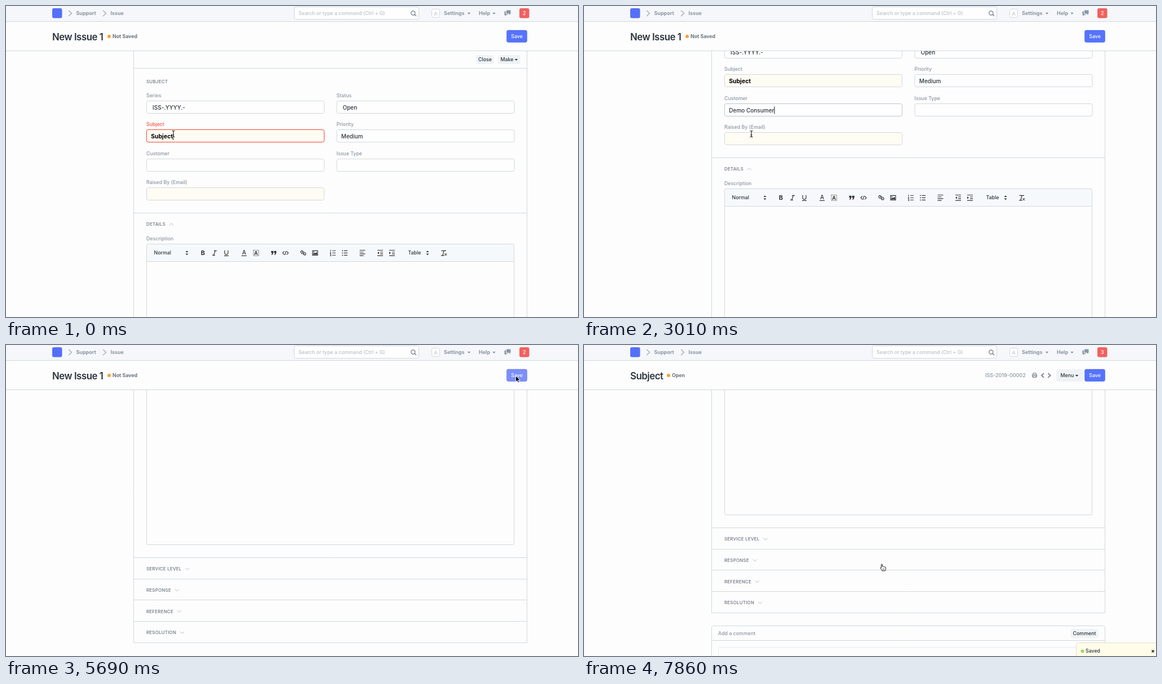
Write an HTML page with a canvas that moves like this. It is 1015x552 px and loops after 8 s.

```html
<!DOCTYPE html>
<html lang="en">
<head>
<meta charset="utf-8">
<title>Issue form</title>
<style>
html, body { margin: 0; height: 100%; overflow: hidden; background: #fdfdfd; }
canvas { display: block; width: 1015px; height: 552px; }
</style>
</head>
<body>
<canvas></canvas>
<script>
const W = 1015, H = 552, LOOP = 8000;
const INK = '#2b343d', GREY = '#8a96a3', MID = '#687480', LINE = '#d1d8dd', PAGE = '#fdfdfd';
const CUSTOMER = 'Demo Consumer';
const canvas = document.querySelector('canvas'), c = canvas.getContext('2d');
const dpr = window.devicePixelRatio || 1;
canvas.width = W * dpr;
canvas.height = H * dpr;

// Value of the last [time, value] key that has been reached.
const at = (t, keys) => keys.reduce((v, k) => t >= k[0] ? k[1] : v, keys[0][1]);

const SCROLL = [[0, 0], [2560, 4], [2710, 25], [2860, 62], [3010, 98], [3160, 120], [3310, 128],
  [3610, 270], [3750, 396], [5990, 0], [7410, 40], [7560, 200], [7710, 420], [7860, 537]];
const POINTER = [[0, ['beam', 297, 227]], [4350, ['beam', 325, 203]], [4500, ['beam', 430, 150]],
  [4650, ['arrow', 610, 82]], [4800, ['arrow', 770, 28]], [4940, ['arrow', 862, 12]],
  [5090, ['hand', 898, 46]], [5240, ['hand', 904, 55]], [5690, ['arrow', 904.5, 54.5]],
  [6190, ['hand', 904.5, 55.5]], [6820, ['arrow', 850, 140]], [6970, ['arrow', 610, 335]],
  [7110, ['hand', 528.5, 388.5]]];
const SAVE = [[0, '#5573fc'], [5090, '#2255fa'], [5690, '#7c8ffb'], [6190, '#2255fa'], [6820, '#5573fc']];
const TOAST = [[0, W + 5], [6340, 937], [6490, 880], [6670, 873]];

function text(s, x, y, color = INK, size = 8.8, weight = 500, align = 'left', spacing = 0) {
  c.font = `${weight} ${size}px Inter, sans-serif`;
  c.letterSpacing = spacing + 'px';
  c.textAlign = align;
  c.fillStyle = color;
  c.fillText(s, x, y + size * .36);
}
function box(x, y, w, h, fill, stroke, r = 3) {
  c.beginPath();
  c.roundRect(x, y, w, h, r);
  if (fill) { c.fillStyle = fill; c.fill(); }
  if (stroke) { c.strokeStyle = stroke; c.lineWidth = 1; c.stroke(); }
}
function shape(d, x, y, { fill, stroke, width = 1 }) {
  const p = new Path2D(d);
  c.save();
  c.translate(x, y);
  if (fill) { c.fillStyle = fill; c.fill(p); }
  if (stroke) { c.strokeStyle = stroke; c.lineWidth = width; c.stroke(p); }
  c.restore();
}
const crisp = y => Math.floor(y) + .5;
const rule = (y, x = 226, x2 = 925) => shape(`M${x} ${crisp(y)}H${x2}`, 0, 0, { stroke: LINE });
const dot = (x, y, color) => box(x - 3, y - 3, 6, 6, color, null, 3);
const down = (x, y, color) => shape('M-2.8-1.5H2.8L0 1.6Z', x, y, { fill: color });
const plus = (x, y) => shape('M-3.2 0H3.2M0-3.2V3.2', x, y, { stroke: GREY });

function heading(s, y, arrow) {
  text(s, 249, y, MID, 7.9, 500, 'left', .25);
  const x = 249 + c.measureText(s).width + 10.5;
  if (arrow) shape(arrow > 0 ? 'M-3.5-1.8L0 1.8 3.5-1.8' : 'M-3.5 1.8L0-1.8 3.5 1.8', x, y, { stroke: '#b4bcc4' });
}

function field(x, y, label, value = '', o = {}) {
  const top = crisp(y + 9.6);
  text(label, x, y, o.labelColor || GREY);
  box(x + .5, top, 315, 22, o.required ? '#fffcf3' : '#fefefe', o.border || LINE);
  if (o.glow) {
    c.globalAlpha = o.glow;
    box(x - .5, top - 1, 317, 24, null, '#fde3df', 4);
    box(x + .5, top, 315, 22, null, '#f4564a');
    c.globalAlpha = 1;
  }
  const left = x + (o.pad || 8.3);
  text(value, left, y + 21.7, o.bold ? '#000' : INK, o.bold ? 10.4 : 10, o.bold ? 700 : 500);
  if (o.caret) {
    c.fillStyle = '#111';
    c.fillRect(left + c.measureText(value).width, y + 15, 1, 13);
  }
}

function lines(x, y, rows) {
  shape(rows.map(([a, b], i) => `M${a} ${i * 3.2 - 4.8}H${b}`).join(''), x, y, { stroke: '#333', width: 1.1 });
}
function editor(y) {
  const k = { stroke: '#333', width: 1.2 }, mid = y + 15.8;
  text('Description', 249, y - 9.5, GREY);
  box(249.5, y, 652, 328, PAGE, LINE);
  box(249.5, y, 652, 31, '#f6f9fb', LINE, [3, 3, 0, 0]);
  text('Normal', 262.5, mid);
  text('Table', 713.5, mid);
  for (const x of [321, 748]) shape('M-2.5-1.2L0-4 2.5-1.2ZM-2.5 1.2L0 4 2.5 1.2Z', x, mid, { fill: '#333' });
  text('B', 349.5, mid, '#333', 11, 700, 'center');
  shape('M-1-4H4M-4 4H1M1.5-4L-1.5 4', 370, mid, k);
  shape('M-3-4.5V0A3 3 0 0 0 3 0V-4.5M-4 5H4', 391, mid, k);
  text('A', 422.5, mid - 1, '#333', 10, 500, 'center');
  shape('M-4.5 5H4.5', 422.5, mid, k);
  c.setLineDash([1.5, 1]);
  box(439, mid - 5, 9.5, 10, null, '#555', 0);
  c.setLineDash([]);
  text('A', 443.7, mid, '#333', 9, 700, 'center');
  shape('M-4.5-3.5H-.5V0L-2.5 3.5H-4L-2.8 0H-4.5ZM.7-3.5H4.7V0L2.7 3.5H1.2L2.4 0H.7Z', 475, mid, { fill: '#333' });
  shape('M-2-3L-5 0-2 3M2-3L5 0 2 3M1-3.5L-1 3.5', 496, mid, k);
  shape('M1-1L-1.5-3.5A2 2 0 0 0-4.3-.8L-1.8 1.7M-1 1L1.5 3.5A2 2 0 0 0 4.3.8L1.8-1.7M-2-2L2 2', 527.5, mid, k);
  shape('M-4.5-4H4.5V4H-4.5Z', 548.5, mid, k);
  shape('M-3.5 3V1.5L-1.5-.5 0 1 2-1.5 3.5.5V3ZM-3-2.5H-1.3V-1H-3Z', 548.5, mid, { fill: '#333' });
  shape('M-1-4H5M-1 0H5M-1 4H5M-4-5.5V-2.5M-5-1H-3.5L-5 1.3H-3M-5 3H-3.3V5.3H-5', 580, mid, { stroke: '#333' });
  shape('M-1.5-4H5M-1.5 0H5M-1.5 4H5M-5-4H-3M-5 0H-3M-5 4H-3', 601, mid, k);
  lines(632.5, mid, [[-5, 5], [-5, 2], [-5, 5], [-5, 2]]);
  for (const [x, tri] of [[664, 'M-5 0L-2-2.3V2.3Z'], [685, 'M-2 0L-5-2.3V2.3Z']]) {
    lines(x, mid, [[-5, 5], [0, 5], [0, 5], [-5, 5]]);
    shape(tri, x, mid, { fill: '#333' });
  }
  shape('M-4.5-4H4M0-4L-2 4M-5 4.5H.5M1.5 1L5 4.5M5 1L1.5 4.5', 777, mid, k);
}

function formActions() {
  for (const [x, w] of [[834, 31.5], [873, 39.5]]) box(x, 87, w, 16, '#f0f3f6');
  text('Close', 838, 95);
  text('Make', 877.5, 95);
  down(905.5, 95.5, INK);
  rule(110.5);
}

// Description editor and collapsed sections, shared by both forms.
function details(dy) {
  rule(367.5 + dy);
  heading('DETAILS', 387.5 + dy, -1);
  editor(422.5 + dy);
  ['SERVICE LEVEL', 'RESPONSE', 'REFERENCE', 'RESOLUTION'].forEach((s, i) => {
    const y = 773.5 + dy + i * 37.65;
    rule(y);
    heading(s, y + 20, 1);
  });
  const end = 924.1 + dy;
  rule(end);
  shape(`M226.5 0V${end}M924.5 0V${end}`, 0, 0, { stroke: LINE });
}

function newForm(t) {
  const picked = t >= 1960, blink = Math.floor((t - 160) / 600) % 2 === 0;
  const red = at(t, [[0, 1], [150, .7], [310, .3], [470, 0]]);
  formActions();
  heading('SUBJECT', 134.5);
  field(249, 158.5, 'Series', 'ISS-.YYYY.-', { pad: 11 });
  field(586.5, 158.5, 'Status', 'Open', { pad: 11 });
  field(249, 210, 'Subject', 'Subject', {
    required: true, bold: true, glow: red, labelColor: t < 150 ? '#f8524c' : GREY, caret: t < 150
  });
  field(586.5, 210, 'Priority', 'Medium');
  field(586.5, 261.5, 'Issue Type');
  field(249, 313, 'Raised By (Email)', '', { required: true });
  field(249, 261.5, 'Customer', picked ? CUSTOMER : '', {
    border: t >= 150 ? '#bcc4cc' : LINE, caret: t >= 150 && blink
  });
  details(0);
  if (t >= 1360 && !picked) {
    box(249.5, 293.5, 315, 96.5, '#fff', LINE);
    box(250, 294, 314, 32, '#f0f4f7', null, 0);
    text(CUSTOMER, 257, 310, INK, 8.8, 700);
    text('+ Create a new Customer', 257, 342);
    text('Advanced Search', 257, 374);
  }
}

function sidebar() {
  text('Comments', 82, 97);
  box(199, 90, 16, 14.5, '#f0f3f6', null, 7);
  text('0', 207, 97, INK, 8.8, 500, 'center');
  [['Assigned To', 123.5], ['Attachments', 168], ['Tags', 212], ['Reviews', 258], ['Shared With', 306.7]]
    .forEach(([s, y]) => text(s, 82, y, INK, 8.8, 600));
  text('Assign', 82, 141, GREY);
  plus(117, 141.5);
  text('Attach File', 82, 185.5, GREY);
  plus(133.5, 185.5);
  text('Add a tag ...', 81.5, 227, GREY, 8.2);
  for (const y of [277.5, 330.5]) {
    c.setLineDash([2, 1.5]);
    box(82.5, y - 9, 17, 18, null, LINE);
    c.setLineDash([]);
    plus(91, y);
  }
  shape('M0 4L-4 0C-6-3-2-5.5 0-2.5 2-5.5 6-3 4 0Z', 87, 360.5, { fill: '#bfc6cd' });
  [['edited', 388], ['created', 424.3]].forEach(([verb, y]) => {
    text('You', 82, y, GREY, 8.8, 700);
    const w = c.measureText('You ').width;
    text(verb + ' this', 82 + w, y, GREY);
    text('a few seconds ago', 82, y + 12.5, GREY);
  });
}

function savedForm() {
  sidebar();
  formActions();
  c.fillStyle = '#eff2fd';
  c.fillRect(227, 111, 697, 36);
  rule(147);
  [['Time to Respond: 21 hours', 252], ['Time to Resolve: a day', 590]].forEach(([s, x]) => {
    dot(x, 129.5, '#98d85b');
    text(s, x + 5.8, 129.2, MID, 9, 700);
  });
  heading('DASHBOARD', 167.5, -1);
  text('Activity', 249, 202, INK, 8.8, 600);
  text('Task', 249, 223.5);
  rule(249.5);
  heading('SUBJECT', 273.5);
  field(249, 297.5, 'Subject', 'Subject', { required: true, bold: true });
  field(586.5, 297.5, 'Status', 'Open', { pad: 11 });
  field(249, 349, 'Customer', CUSTOMER);
  field(586.5, 349, 'Priority', 'Medium');
  field(586.5, 400.5, 'Issue Type');
  details(88);
  box(226.5, 1035.5, 698, 200, PAGE, LINE);
  text('Add a comment', 238, 1049, GREY);
  box(863.5, 1041, 49, 16, '#f0f3f6');
  text('Comment', 888, 1049, INK, 8.8, 500, 'center');
  rule(1061.5);
  box(238.5, 1073.5, 674, 100, PAGE, '#e6eaed');
}

function navbar(t) {
  c.fillStyle = '#f5f7fa';
  c.fillRect(0, 0, W, 27);
  rule(27.5, 0, W);
  box(82, 4, 17.5, 17.5, '#5470f8');
  for (const x of [114, 175]) shape('M-2.8-5L2.5 0-2.8 5', x, 13, { stroke: '#a3adb7', width: 1.4 });
  text('Support', 124.5, 13, GREY, 8.95, 700);
  text('Issue', 185.5, 13, GREY, 8.95, 700);
  box(511.5, 1.5, 221, 22, '#fefefe', LINE);
  text('Search or type a command (Ctrl + G)', 519, 13, '#b9c1c9', 8.75);
  shape('M3-.5A3.6 3.6 0 1 1-4.2-.5 3.6 3.6 0 1 1 3-.5M2 2L5 5', 723, 13, { stroke: MID, width: 1.2 });
  box(755.5, 5.5, 14, 15, '#fefefe', LINE);
  text('A', 762.5, 13.2, '#bcc4cc', 9.5, 400, 'center');
  text('Settings', 777, 13, GREY, 9, 700);
  text('Help', 839, 13, GREY, 9, 700);
  down(821.5, 13.3, GREY);
  down(866, 13.3, GREY);
  shape('M-2-5H5.5V1H4.5V3.5L2 1H-2ZM-5.5-3H-3V2H1L-1 3.5H-2.5L-4.5 5.5V3.5H-5.5Z', 890, 12.5, { fill: GREY });
  box(911, 4, 17.5, 17.5, '#f0625f');
  text(t >= 7560 ? '3' : '2', 919.7, 13, '#fff', 8.8, 500, 'center');
}

function titleBar(t, saved) {
  c.fillStyle = PAGE;
  c.fillRect(0, 28, W, 52);
  rule(79.5, 0, W);
  text(saved ? 'Subject' : 'New Issue 1', 82, 54.5, INK, 16.8, 600, 'left', -.45);
  const x = saved ? 150 : 183;
  dot(x, 54, '#f8a23c');
  text(saved ? 'Open' : 'Not Saved', x + 6, 54, MID, 8.8, 700);
  if (saved) {
    text('ISS-2019-00002', 712, 54, GREY, 9);
    shape('M-2.7-1V-4H2.7V-1M-2.7 2H-4V-1H4V2H2.7M-2.7 1H2.7V3.7H-2.7Z', 799.5, 54, { stroke: MID });
    shape('M2-4L-2 0 2 4', 814, 54, { stroke: MID, width: 1.7 });
    shape('M-2-4L2 0-2 4', 825.5, 54, { stroke: MID, width: 1.7 });
    box(838, 43, 47, 22, '#f0f3f6');
    text('Menu', 845.5, 54);
    down(874.5, 54.5, INK);
  }
  box(888.5, 43, 36, 21.5, at(t, SAVE), 'rgba(50, 75, 235, .4)');
  text('Save', 906.5, 54, '#fff', 8.8, 500, 'center');
}

function toast(x) {
  box(x + .5, 528.5, 160, 40, '#fffdea', '#dfdfcf', 4);
  dot(x + 11.5, 543.5, '#98d85b');
  text('Saved', x + 17, 543.2);
  shape('M-2-2L2 2M2-2L-2 2', x + 136.5, 543.5, { stroke: '#222', width: 1.5 });
}

function pointer([kind, x, y]) {
  if (kind === 'beam') {
    const d = 'M-2.5-5.5Q0-5.5 0-4Q0-5.5 2.5-5.5M0-4.5V4.5M-2.5 5.5Q0 5.5 0 4Q0 5.5 2.5 5.5M-1.5 2H1.5';
    shape(d, x, y, { stroke: '#fff', width: 2.4 });
    shape(d, x, y, { stroke: '#111', width: 1.1 });
  } else if (kind === 'arrow') {
    shape('M0 0V11L2.6 8.6 4.2 12.4 6 11.6 4.4 8H7.6Z', x, y, { fill: '#000', stroke: '#fff', width: .9 });
  } else {
    shape('M-1 1Q0-.8 1 1V4.6Q2.3 3.8 3 5 4.3 4.3 5 5.6 6.8 5 7 7V9Q6 11 6 12.3H.5Q0 10.5-2.4 7.6-2.6 6-1 6.6Z',
      x, y, { fill: '#fff', stroke: '#111', width: 1 });
    shape('M2 8V10.5M4 8V10.5', x, y, { stroke: '#111', width: .7 });
  }
}

function draw(t) {
  const saved = t >= 5990;
  c.setTransform(dpr, 0, 0, dpr, 0, 0);
  c.fillStyle = PAGE;
  c.fillRect(0, 0, W, H);
  c.save();
  c.translate(0, -at(t, SCROLL));
  saved ? savedForm() : newForm(t);
  c.restore();
  titleBar(t, saved);
  navbar(t);
  toast(at(t, TOAST));
  pointer(at(t, POINTER));
}

function tick(now) {
  draw(now % LOOP);
  requestAnimationFrame(tick);
}
tick(0);
</script>
</body>
</html>
```
